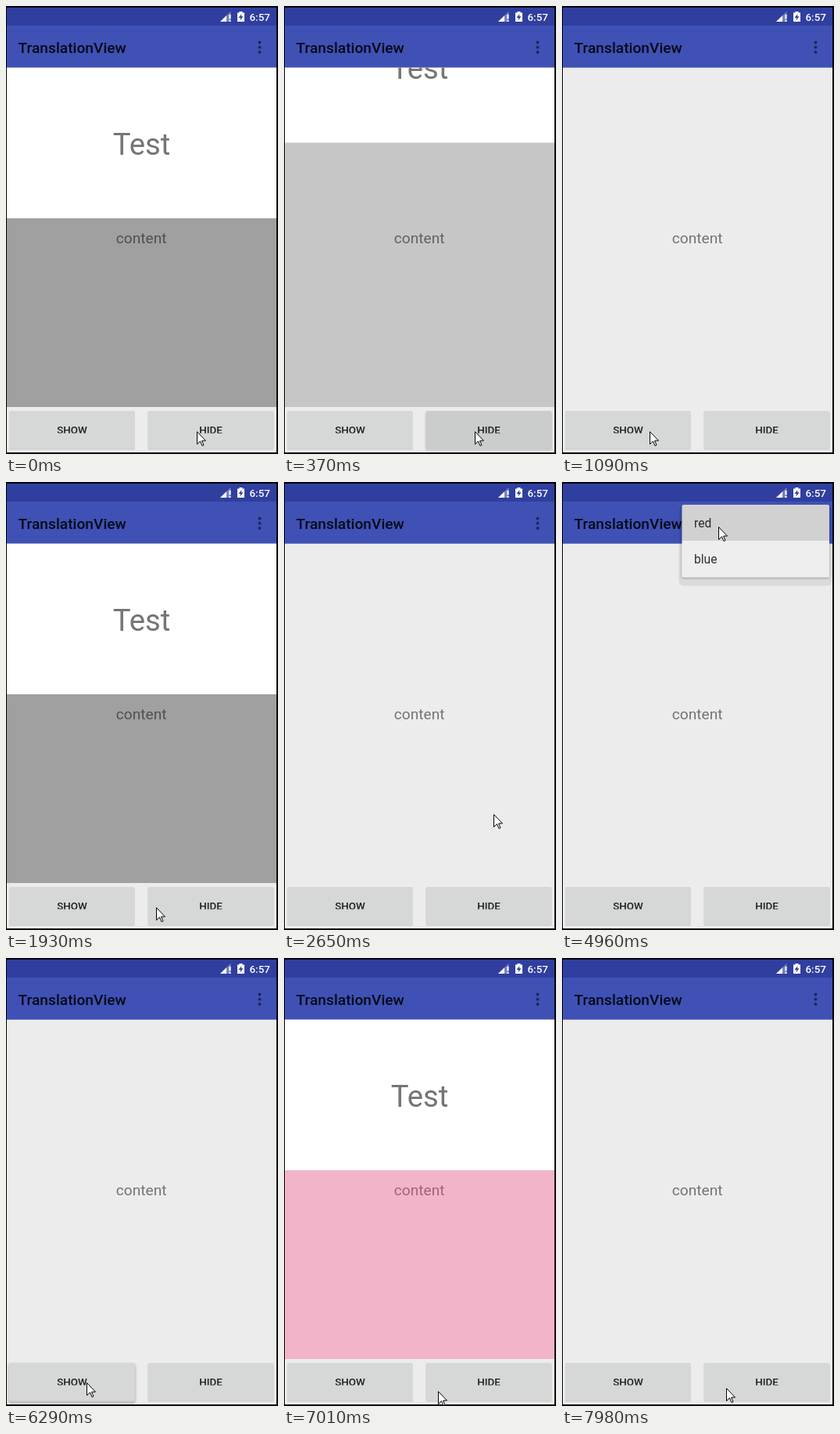
An HTML page that plays this animation: 348 px wide and 572 px high, repeating every 8000 ms.

```html
<!DOCTYPE html>
<html lang="en">
<head>
<meta charset="utf-8">
<title>TranslationView</title>
<style>
html, body { margin: 0; width: 100%; height: 100%; overflow: hidden; background: #000; }
svg { display: block; width: 348px; height: 572px; }
text { font-family: Roboto, sans-serif; }
.mid { text-anchor: middle; }
.btn { font-size: 13.4px; font-weight: 500; fill: #1d1e1e; }
.item { font-size: 15.6px; fill: #000; fill-opacity: .8; }
</style>
</head>
<body>
<svg viewBox="0 0 348 572" width="348" height="572">
  <defs>
    <clipPath id="body"><rect x="1" y="78.7" width="345" height="433.300"/></clipPath>
    <clipPath id="label"><rect x="0" y="530" width="348" height="15.6"/></clipPath>
    <filter id="blur" x="-10%" y="-20%" width="120%" height="140%"><feGaussianBlur stdDeviation="1.6"/></filter>
  </defs>
  <rect width="348" height="572" fill="#000"/>
  <rect x="1" y="2" width="345" height="568" fill="#ececec"/>
  <rect x="1" y="2" width="345" height="23" fill="#303f9f"/>
  <rect x="1" y="25" width="345" height="53.7" fill="#3f51b5"/>

  <g fill="#fff">
    <path d="M274 20L287.500 7V20Z" fill-opacity=".35"/>
    <path d="M274 20L282 12.300V20Z"/>
    <path d="M285.500 11h2v5.500h-2zM285.500 18h2v2h-2z"/>
    <path d="M298.500 7h4v1.500h2.500V20h-9V8.500h2.500z"/>
    <path d="M301.500 10L297.500 15h2.500L299.500 18.500L303.500 13.200h-2.500z" fill="#303f9f"/>
    <text x="311.500" y="19" font-size="13.4" font-weight="500">6:57</text>
  </g>
  <text x="15.500" y="60" font-size="19.17" font-weight="500" fill="#080a17">TranslationView</text>
  <g fill="#1d2658">
    <circle cx="324.500" cy="46.500" r="1.9"/><circle cx="324.500" cy="52.700" r="1.9"/><circle cx="324.500" cy="59" r="1.9"/>
  </g>

  <g clip-path="url(#body)">
    <text class="mid" x="173.200" y="303" font-size="19.17" fill="#757575">content</text>
    <rect id="shade" x="1" y="78" width="345" height="434"/>
    <g id="panel">
      <rect x="1" y="78" width="345" height="193" fill="#fff"/>
      <text class="mid" x="173.500" y="189.700" font-size="38.3" fill="#757575">Test</text>
    </g>
  </g>

  <g id="buttons"></g>

  <g id="menu">
    <rect x="149.500" y="31" width="196" height="101.500" rx="6" fill="#000" fill-opacity=".08"/>
    <rect x="153" y="31" width="189" height="92" rx="2" fill="#000" fill-opacity=".25" filter="url(#blur)"/>
  </g>
  <g id="sheet">
    <rect x="153.500" y="29" width="188.500" height="50" fill="#3f51b5"/>
    <rect x="153.500" y="78.7" width="188.500" height="42.800" fill="#ececec"/>
  </g>
  <g id="popup">
    <rect x="153.500" y="29" width="188.500" height="92.500" rx="2" fill="#eee"/>
    <rect id="pick" x="153.500" y="29" width="188.500" height="46" fill="#000"/>
    <text class="item" x="169" y="58.300">red</text>
    <text class="item" x="169" y="104">blue</text>
  </g>

  <path id="cursor" d="M.5 .5V16.500L4.500 12.700L7 18.500L9 17.600L6.600 12H11.500Z" fill="#fff" stroke="#000"/>
</svg>
<script>
// all times below are in screen refreshes
const LOOP = 8000, TICK = 120.9, LEAD = 14;
const $ = id => document.getElementById(id);
const set = (id, name, value) => $(id).setAttribute(name, value);
const ramp = (t, start, len) => Math.max(0, Math.min(1, (t - start) / len));
const ease = p => (1 - Math.cos(Math.PI * p)) / 2;
const mix = (a, b, p) => Math.round(a + (b - a) * p);

const buttons = [
  { x: 4, label: "SHOW", dir: 1, taps: [11, 52] },
  { x: 181.5, label: "HIDE", dir: -1, taps: [2, 18, 62] }
];
const menu = { open: 32, pick: 41, close: 42 };

// where the pointer rests, and when
const stops = [
  { x: 244, y: 543, from: 0, to: 5 },
  { x: 112, y: 543, from: 9, to: 12 },
  { x: 222, y: 543, from: 17.5, to: 20 },
  { x: 314, y: 304, from: 24, to: 25 },
  { x: 338, y: 66, from: 27, to: 27 },
  { x: 323, y: 47, from: 29, to: 33 },
  { x: 200, y: 57, from: 38, to: 43 },
  { x: 126, y: 494, from: 47, to: 47 },
  { x: 103, y: 542, from: 50, to: 54 },
  { x: 197, y: 553, from: 58, to: 58 },
  { x: 237, y: 552, from: 60, to: 63 },
  { x: 210, y: 549, from: 66, to: 67 }
];

$("buttons").innerHTML = buttons.map(({ x, label }, i) => {
  const box = (y, h, attrs) => `<rect x="${x}" y="${y}" width="161" height="${h}" rx="2" ${attrs}/>`;
  return box(519, 49, `id="lift${i}" fill="#000" stroke="#000" fill-opacity=".22" stroke-opacity=".22" filter="url(#blur)"`)
    + box(518, 48.5, 'fill="#c9caca"')
    + box(517, 48.5, 'fill="#d6d7d7"')
    + box(517, 48.5, `id="press${i}" fill="#000"`)
    + `<text class="mid btn" x="${x + 80.5}" y="546" clip-path="url(#label)">${label}</text>`;
}).join("");

function pointer(t) {
  const i = stops.findLastIndex(s => s.from <= t);
  const a = stops[i], b = stops[i + 1] || a;
  const p = b === a ? 0 : ramp(t, a.to, b.from - a.to);
  return `translate(${mix(a.x, b.x, p)} ${mix(a.y, b.y, p)})`;
}

function draw(now) {
  const t = Math.floor((now % LOOP + LEAD) / TICK);

  let open = 1;
  buttons.forEach(({ dir, taps }, i) => {
    const runs = taps.map(s => ramp(t, s, 2));
    runs.forEach(p => open += dir * ease(p));
    set("lift" + i, "opacity", Math.max(...taps.map((s, k) => t < s ? 0 : 1 - runs[k])));
    set("press" + i, "fill-opacity", .05 * Math.max(...runs.map(p => Math.sin(Math.PI * p))));
  });
  set("panel", "transform", `translate(0 ${-193 * (1 - open)})`);
  set("shade", "fill", t < menu.pick ? "#000" : "#ff4081");
  set("shade", "fill-opacity", .32 * open);

  const alpha = t < menu.open ? 0 : (.71 + .29 * ramp(t, menu.open, 1)) * (1 - ramp(t, menu.close, 2));
  set("menu", "opacity", alpha);
  set("sheet", "opacity", alpha > 0 ? 1 : 0);
  set("popup", "opacity", alpha);
  set("pick", "fill-opacity", t < menu.pick ? 0 : .12);

  set("cursor", "transform", pointer(t));
  set("cursor", "opacity", t >= 25 && t < 27 ? 0 : 1);
}

const begin = performance.now();
(function loop() {
  draw(performance.now() - begin);
  requestAnimationFrame(loop);
})();
</script>
</body>
</html>
```
